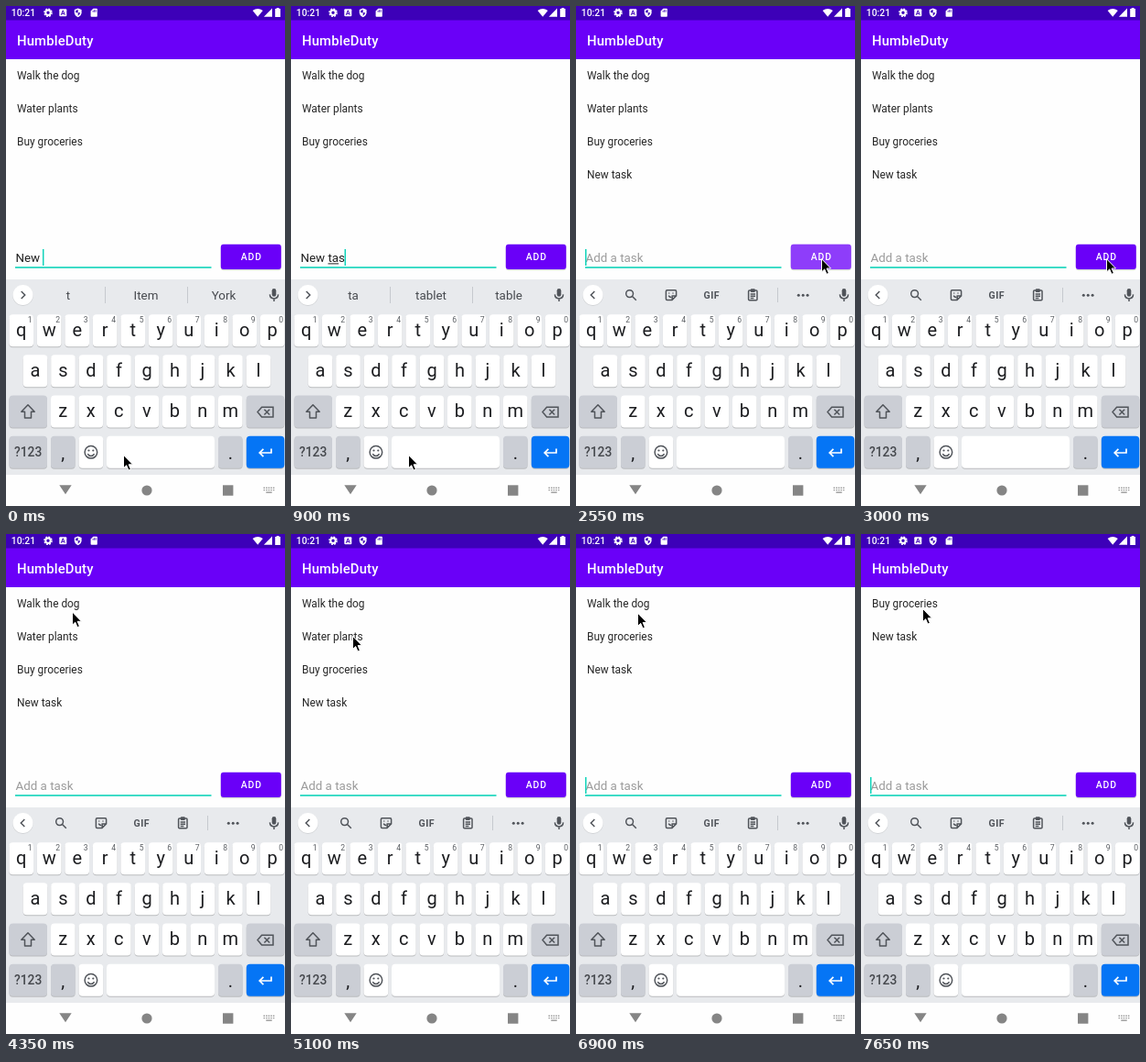
Recreate the animation shown at these times as an HTML page. Size 305 by 545 pixels, loop 8 s.

```html
<!DOCTYPE html>
<html lang="en">
<head>
<meta charset="utf-8">
<title>To-do list</title>
<style>
  html, body { margin: 0; width: 100%; height: 100%; overflow: hidden; background: #fff; }
  svg { display: block; width: 305px; height: 545px; }
  text { font-family: Roboto, "Noto Sans", sans-serif; white-space: pre; }
  .mid { text-anchor: middle; }
  .row { font-size: 11.9px; fill: #272727; }
  .field { font-size: 13.36px; fill: #202020; }
  .key { font-size: 20px; fill: #1d1e21; }
  .num { font-size: 8.6px; fill: #5b5f64; }
  .word { font-size: 13.4px; fill: #46494e; }
  .line { fill: none; stroke: #50545a; stroke-width: 1.5; }
</style>
</head>
<body>
<svg viewBox="0 0 305 545">
  <rect width="305" height="545" fill="#fefefe"/>

  <!-- status bar and title -->
  <rect width="305" height="16" fill="#3d00b8"/>
  <rect y="15.5" width="305" height="42.5" fill="#6a00f8"/>
  <g fill="#fff">
    <text x="5.8" y="11" font-size="10.4" font-weight="500">10:21</text>
    <circle cx="46" cy="7.3" r="2.7" fill="none" stroke="#fff" stroke-width="2"/>
    <circle cx="46" cy="7.3" r="4.1" fill="none" stroke="#fff" stroke-width="1.4" stroke-dasharray="1.9 1.3"/>
    <rect x="58.3" y="3.3" width="8" height="8" rx="1"/>
    <path d="M60.3 9.8L62.3 4.8L64.3 9.8M61 8.3H63.6" fill="none" stroke="#3d00b8"/>
    <path d="M78.7 2.4L82.6 4V7.2Q82.4 10.6 78.7 12.2Q75 10.6 74.8 7.2V4Z"/>
    <path d="M78.7 4V7.3H81.2Q80.7 9.6 78.7 10.7V7.3H76.2V5Z" fill="#3d00b8"/>
    <path d="M95.4 2.8H99Q99.8 2.8 99.8 3.6V10.9Q99.8 11.7 99 11.7H93.4Q92.6 11.7 92.6 10.9V5.6Z"/>
    <path d="M95.1 5V6.7M96.6 4.2V6.7M98.1 4.2V6.7" stroke="#3d00b8" stroke-width=".8"/>
    <path d="M269.6 5.1Q275.2 .9 280.8 5.1L275.2 11.8Z"/>
    <path d="M291 2.6V11.7H281.9Z"/>
    <path d="M295.7 2V3H294.2V11.9H300V3H298.5V2Z"/>
    <text x="12" y="43" font-size="14.85" font-weight="500" letter-spacing=".16">HumbleDuty</text>
  </g>

  <g id="list"></g>

  <!-- entry field and button -->
  <text id="entry" class="field" x="10.5" y="279.2"></text>
  <path id="under" stroke="#202020" stroke-width="1"/>
  <rect x="10" y="284.2" width="214.5" height="1.6" fill="#10d3ba"/>
  <rect id="caret" y="265" width="1.5" height="18" fill="#10d3ba"/>
  <rect x="234.8" y="261" width="66" height="27.3" rx="3" fill="#000" opacity=".16"/>
  <rect x="234.8" y="259.8" width="66" height="27.2" rx="3" fill="#6a00f8"/>
  <rect id="ripple" x="234.8" y="259.8" width="66" height="27.2" rx="3" fill="#fff"/>
  <text class="mid" x="268.4" y="277.1" font-size="10.4" font-weight="500" letter-spacing=".93" fill="#fff">ADD</text>

  <!-- keyboard -->
  <rect y="298" width="305" height="213" fill="#e8eaed"/>
  <circle cx="18.5" cy="315.7" r="11.2" fill="#000" opacity=".1"/>
  <circle cx="18.5" cy="315" r="11" fill="#fff"/>
  <path id="chevron" class="line"/>
  <g id="words">
    <text class="word mid" x="68" y="320"></text>
    <text class="word mid" x="153" y="320"></text>
    <text class="word mid" x="238" y="320"></text>
    <path d="M108.5 306V324M198.5 306V324" stroke="#c6c9ce"/>
  </g>
  <g id="tools">
    <circle class="line" cx="58.6" cy="313.6" r="3.9"/>
    <path class="line" d="M61.5 316.5L65.8 320.8"/>
    <path class="line" d="M99.6 309.7H108.4Q109.6 309.7 109.6 310.9V316L105 320.4H99.6Q98.4 320.4 98.4 319.2V310.9Q98.4 309.7 99.6 309.7ZM109.3 316H105.2V320.2" stroke-width="1.3"/>
    <path class="line" d="M101.2 315.6Q102.4 317.8 104.6 317.4M101.7 312.4V313.6M106 312.4V313.6" stroke-width="1.2"/>
    <text class="mid" x="148.3" y="318.9" font-size="10.6" font-weight="700" letter-spacing=".5" fill="#50545a">GIF</text>
    <rect class="line" x="188.6" y="310" width="9.4" height="10.8" rx="1"/>
    <rect x="190.8" y="308.3" width="5" height="3.6" rx="1" fill="#50545a"/>
    <path class="line" d="M190.7 314H196M190.7 316.2H196M190.7 318.4H194.4" stroke-width="1"/>
    <path d="M220.5 307V323" stroke="#c6c9ce"/>
    <g fill="#50545a"><circle cx="243.3" cy="315.3" r="1.5"/><circle cx="248.2" cy="315.3" r="1.5"/><circle cx="253.1" cy="315.3" r="1.5"/></g>
  </g>
  <rect x="290.7" y="308" width="4.6" height="8.8" rx="2.3" fill="#50545a"/>
  <path class="line" d="M288.4 314.4Q288.7 318.9 293 318.9Q297.3 318.9 297.6 314.4M293 319V322" stroke-width="1.3"/>
  <g id="keys"></g>

  <path class="line" d="M24 434.8L31.2 442.3H27.5V449H20.5V442.3H16.8Z" stroke-linejoin="round"/>
  <path class="line" d="M279.6 437.2H292V448H279.6L275 442.6ZM282.4 439.7L288.2 445.5M288.2 439.7L282.4 445.5" stroke-width="1.4"/>
  <g class="line" stroke-width="1.4">
    <circle cx="92.9" cy="486.3" r="6.8"/>
    <path d="M89.2 488.2Q92.9 493 96.6 488.2"/>
  </g>
  <circle cx="90.5" cy="484.5" r="1.1" fill="#50545a"/>
  <circle cx="95.3" cy="484.5" r="1.1" fill="#50545a"/>
  <path d="M290 482.6V487H277.4M281.4 482.8L277.2 487L281.4 491.2" fill="none" stroke="#fff" stroke-width="1.7"/>

  <!-- navigation bar -->
  <g fill="#858585">
    <path d="M58.3 522.3H71.7L65 532.3Z"/>
    <circle cx="154" cy="528" r="5.6"/>
    <rect x="237" y="522.3" width="11.4" height="11.4"/>
  </g>
  <path d="M281.5 525.2H293.5M281.5 527.6H293.5" stroke="#999" stroke-width="1.4" stroke-dasharray="1.5 1.1"/>
  <path d="M284.3 530.2H290.7" stroke="#999" stroke-width="1.4"/>

  <path id="mouse" d="M0 0V14.2L3.2 11.2L5.5 16.6L7.9 15.6L5.6 10.3H10Z" fill="#000" stroke="#fff" stroke-width="1" stroke-linejoin="round"/>
</svg>
<script>
const LOOP = 8000, TICK = 150;
const $ = id => document.getElementById(id);

function add(parent, tag, attrs, content = '') {
  const el = document.createElementNS('http://www.w3.org/2000/svg', tag);
  for (const name in attrs) el.setAttribute(name, attrs[name]);
  el.textContent = content;
  parent.append(el);
  return el;
}

// Keyboard
const keys = $('keys'), PITCH = 30.5;

function cap(x, y, w, fill) {
  add(keys, 'rect', { x, y: y + 1, width: w, height: 35, rx: 4, fill: '#000', opacity: .2 });
  add(keys, 'rect', { x, y, width: w, height: 35, rx: 4, fill });
}

function letters(row, cx, y) {
  [...row].forEach((ch, i) => {
    const x = cx + i * PITCH;
    cap(x - 13.3, y, 26.6, '#fff');
    add(keys, 'text', { class: 'key mid', x, y: y + 23.6 }, ch);
    if (row.length === 10) add(keys, 'text', { class: 'num mid', x: x + 9.5, y: y + 8.7 }, (i + 1) % 10);
  });
}

letters('qwertyuiop', 16.7, 336.2);
letters('asdfghjkl', 32, 380.2);
letters('zxcvbnm', 62.3, 424.6);
const GREY = '#cbced5';
cap(3.5, 424.6, 41.5, GREY);
cap(262.8, 424.6, 41.5, GREY);
cap(3.5, 468.8, 41.5, GREY);
cap(49, 468.8, 26.6, GREY);
cap(79.6, 468.8, 26.6, '#fff');
cap(110, 468.8, 118, '#fff');
cap(232, 468.8, 26.6, GREY);
cap(262.8, 468.8, 41.5, '#0575f5');
add(keys, 'text', { class: 'mid', x: 24.2, y: 491.4, 'font-size': 13.8, 'font-weight': 500, fill: '#45484d' }, '?123');
add(keys, 'text', { class: 'key mid', x: 62.3, y: 494 }, ',');
add(keys, 'text', { class: 'key mid', x: 245.3, y: 494 }, '.');

// Timelines: [start, value...]
const lists = [
  [0, 'Walk the dog', 'Water plants', 'Buy groceries'],
  [2550, 'Walk the dog', 'Water plants', 'Buy groceries', 'New task'],
  [6000, 'Walk the dog', 'Buy groceries', 'New task'],
  [7650, 'Buy groceries', 'New task']
];
// text, end of the underlined part
const typing = [
  [0, 'New ', 4], [450, 'New t', 5], [600, 'New ta', 6],
  [900, 'New tas', 6], [1200, 'New task', 8], [2550, '', 0]
];
const hints = [
  [0, 't', 'Item', 'York'], [750, 'ta', 'tablet', 'table'],
  [1350, 'task', 'tasks', 'tasked'], [2550]
];
const carets = [
  [0, 1], [1650, 0], [2400, 1], [3000, 0], [3600, 1], [4050, 0], [4650, 1],
  [5100, 0], [6000, 1], [6150, 0], [6600, 1], [7050, 0], [7650, 1]
];
const ripples = [[0, 0], [2400, .12], [2550, .24], [2700, .16], [2850, .07], [3000, 0]];
const path = [
  [0, 128.5, 489.5], [1200, 128.5, 489.5], [2100, 268.5, 275.7], [3450, 268.5, 275.7],
  [3600, 266.5, 282], [4350, 72.5, 85], [4500, 72.5, 84], [5100, 67.5, 111.3],
  [6450, 67.5, 111.3], [7050, 67.5, 81.5], [LOOP, 67.5, 81.5]
];

const at = (table, t) => table.filter(step => step[0] <= t).pop().slice(1);

function pointer(t) {
  const i = path.findIndex(p => p[0] > t);
  const [t0, x0, y0] = path[i - 1], [t1, x1, y1] = path[i];
  const p = (t - t0) / (t1 - t0), e = p * p * (3 - 2 * p);
  return [x0 + (x1 - x0) * e, y0 + (y1 - y0) * e];
}

const pen = document.createElement('canvas').getContext('2d');
function width(s) {
  pen.font = '13.36px Roboto, "Noto Sans", sans-serif';
  return pen.measureText(s).width;
}

const rows = [0, 1, 2, 3].map(i => add($('list'), 'text', { class: 'row', x: 12, y: 80.4 + 36 * i }));
const words = $('words').querySelectorAll('text');
const show = (el, on) => el.setAttribute('visibility', on ? 'visible' : 'hidden');

function draw(t) {
  const items = at(lists, t);
  rows.forEach((row, i) => row.textContent = items[i] || '');

  const [text, end] = at(typing, t), entry = $('entry');
  entry.textContent = text || 'Add a task';
  entry.style.fill = text ? '' : '#9b9b9b';
  const left = 10.5 + width(text.slice(0, 4)), right = 10.5 + width(text.slice(0, end));
  $('under').setAttribute('d', end > 4 ? `M${left} 280.9H${right}` : '');
  $('caret').setAttribute('x', 10 + width(text));
  show($('caret'), at(carets, t)[0]);
  $('ripple').setAttribute('opacity', at(ripples, t)[0]);

  const hint = at(hints, t), typed = hint.length > 0;
  words.forEach((w, i) => w.textContent = hint[i] || '');
  show($('words'), typed);
  show($('tools'), !typed);
  $('chevron').setAttribute('d', typed ? 'M16.7 311L20.7 315L16.7 319' : 'M20.3 311L16.3 315L20.3 319');

  $('mouse').setAttribute('transform', `translate(${pointer(t)})`);
}

const start = performance.now();
function loop() {
  const t = (performance.now() - start) % LOOP;
  draw(Math.floor(t / TICK) * TICK);
  requestAnimationFrame(loop);
}
loop();
</script>
</body>
</html>
```
